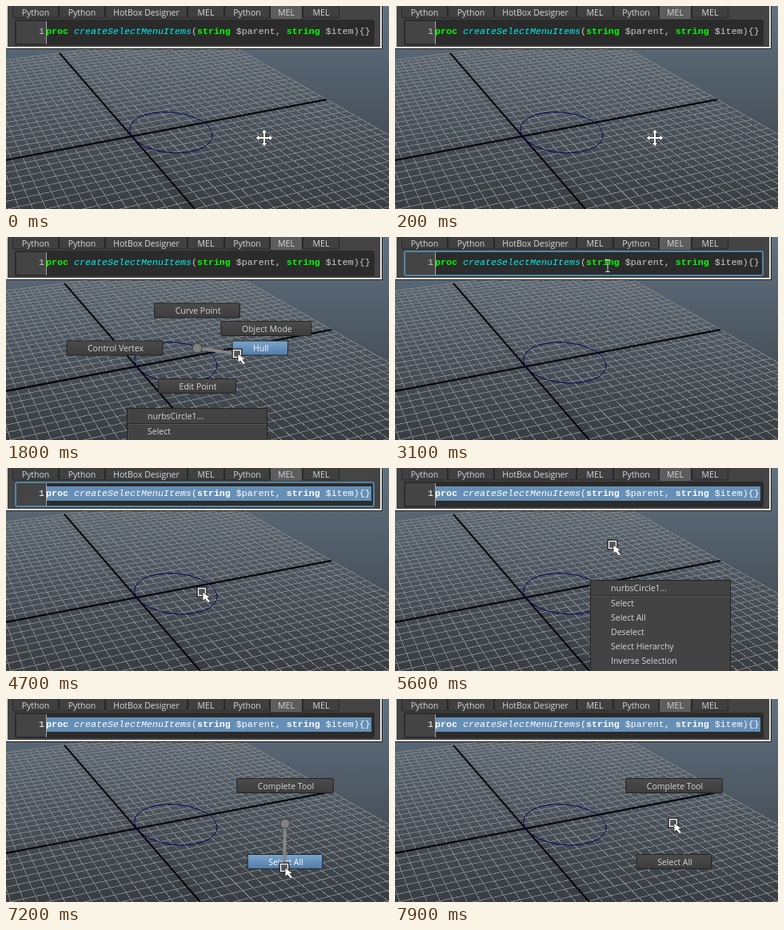
An HTML page that plays this animation: 479x254 px, repeating every 8000 ms.

```html
<!DOCTYPE html>
<html>
<head>
<meta charset="utf-8">
<style>
html, body { margin: 0; width: 100%; height: 100%; overflow: hidden; background: #4a535c; }
svg { display: block; width: 479px; height: 254px; }
text { font: 10.5px "Open Sans", "Noto Sans", sans-serif; fill: #d6d6d6; }
.code { font: 11.67px "Liberation Mono", monospace; white-space: pre; fill: #cccccc; }
.key { font-weight: bold; fill: #00ff00; }
.fn { font-style: italic; fill: #00f0f0; }
.sel .code, .sel .code tspan { fill: #fff; }
.item.on rect { fill: url(#hot); }
.item.on text { fill: #fff; }
</style>
</head>
<body>
<svg id="stage" viewBox="0 0 479 254">
  <defs>
    <linearGradient id="sky" x2="0" y2="1"><stop stop-color="#607181"/><stop offset="1" stop-color="#383d42"/></linearGradient>
    <linearGradient id="btn" x2="0" y2="1"><stop stop-color="#4c4c4c"/><stop offset="1" stop-color="#3c3c3c"/></linearGradient>
    <linearGradient id="hot" x2="0" y2="1"><stop stop-color="#7da5cb"/><stop offset="1" stop-color="#4f7ba6"/></linearGradient>
  </defs>
  <rect width="479" height="254" fill="url(#sky)"/>
</svg>
<script>
const stage = document.getElementById('stage');

function el(tag, attrs, parent = stage, text) {
  const node = document.createElementNS('http://www.w3.org/2000/svg', tag);
  for (const k in attrs) node.setAttribute(k, attrs[k]);
  if (text !== undefined) node.textContent = text;
  parent.appendChild(node);
  return node;
}
const group = (parent = stage) => el('g', {}, parent);
const box = (x, y, r, b, fill, parent, more) =>
  el('rect', { x, y, width: r - x, height: b - y, fill, ...more }, parent);
const label = (x, y, text, parent) => el('text', { x, y, 'text-anchor': 'middle' }, parent, text);
const show = (node, on) => node.setAttribute('visibility', on ? 'visible' : 'hidden');

// Ground plane in perspective; u and v run from -1 to 1
const scene = group();
function ground(u, v) {
  const a = 0.144 * u, b = 0.398 * v, w = 1 + a + b;
  const x = (163.3 + 2100 * a - 154 * b) / w;
  const y = (162 - 204 * a - 204 * b) / w;
  return x.toFixed(2) + ' ' + y.toFixed(2);
}
const lineU = v => `M${ground(-1, v)}L${ground(1, v)}`;
const lineV = u => `M${ground(u, -1)}L${ground(u, 1)}`;
const CELLS = 24;
let grid = '';
for (let i = -CELLS; i <= CELLS; i++) grid += lineU(i / CELLS) + lineV(i / CELLS);
const ring = Array.from({ length: 72 }, (_, i) => {
  const a = i * Math.PI / 36;
  return ground(0.17 + 0.17 * Math.cos(a), 0.17 * Math.sin(a) - 0.016);
});
el('path', { d: grid, stroke: '#828282', 'shape-rendering': 'crispEdges' }, scene);
el('path', { d: lineU(0) + lineV(0), stroke: '#000', 'stroke-width': 2 }, scene);
el('path', { d: `M${ring.join('L')}Z`, fill: 'none', stroke: '#00005c' }, scene);

// Script editor
const panel = group();
box(0, 0, 471, 54, '#222', panel);
box(0, 0, 470, 53, '#e6e3de', panel);
box(2, 0, 468, 51, '#444', panel);
box(8, 0, 417, 15, '#3a3a3a', panel);
const tabs = [[8, 'Python'], [66, 'Python'], [124, 'HotBox Designer'], [227, 'MEL'],
  [273, 'Python'], [330, 'MEL'], [371, 'MEL']];
tabs.forEach(([x, name], i) => {
  const right = i < 6 ? tabs[i + 1][0] : 417;
  const live = i === 5;
  box(x + .5, -4, right - .5, live ? 17 : 15, live ? '#5d5d5d' : '#404040', panel,
    { stroke: '#272727', rx: 2 });
  label((x + right) / 2, 12, name, panel);
});
box(11, 17, 461, 49, '#2b2b2b', panel, { rx: 2 });
box(13, 19, 50, 47, '#444', panel);
const focus = box(12, 18, 460, 48, 'none', panel, { stroke: '#5285a6', 'stroke-width': 2, rx: 2 });
const picked = box(51, 23, 457, 41, '#668fb6', panel);
box(50, 19, 51, 48, '#a8a8a8', panel);
el('text', { class: 'code', x: 41, y: 35 }, panel, '1');
const code = el('text', { class: 'code', x: 50, y: 35 }, panel);
[['proc', 'key'], [' '], ['createSelectMenuItems', 'fn'], ['('], ['string', 'key'],
  [' $parent, '], ['string', 'key'], [' $item){}']]
  .forEach(([s, c]) => el('tspan', c ? { class: c } : {}, code, s));

// Marking menu: items sit around the hub and are as wide as their text needs
function radial(hx, hy, items) {
  const g = group();
  const parts = items.map(([name, dx, dy]) => {
    const item = el('g', { class: 'item' }, g);
    const text = label(0, hy + dy + 4, name, item);
    const half = text.getComputedTextLength() / 2 + 25;
    const cx = hx + dx + Math.sign(dx) * half, cy = hy + dy;
    text.setAttribute('x', cx + 1);
    item.prepend(box(cx - half, cy - 9, cx + half, cy + 9, 'url(#btn)', item, { stroke: '#222', rx: 1 }));
    return { item, cx, cy, half };
  });
  const hub = group(g);
  const arm = el('line', { x1: hx, y1: hy, stroke: '#858585', 'stroke-width': 4 }, hub);
  el('circle', { cx: hx, cy: hy, r: 6, fill: '#808080', stroke: '#3a3a3a' }, hub);
  return (on, x, y) => {
    show(g, on);
    show(hub, on && Math.hypot(x - hx, y - hy) > 5);
    arm.setAttribute('x2', x);
    arm.setAttribute('y2', y);
    for (const p of parts)
      p.item.classList.toggle('on', Math.abs(x - p.cx) < p.half && Math.abs(y - p.cy) < 9);
  };
}
function list(x, y, names) {
  const g = group();
  box(x + .5, y + .5, x + 175.5, 260, '#434343', g, { stroke: '#222' });
  names.forEach((name, i) =>
    el('text', { x: x + 26, y: y + 14 + i * 18 + (i ? 1 : 0) }, g, name));
  box(x + 2, y + 19, x + 174, y + 20, '#2b2b2b', g);
  box(x + 2, y + 20, x + 174, y + 21, '#555', g);
  return g;
}
const curveList = list(151, 214, ['nurbsCircle1...', 'Select']);
const curveMenu = radial(239, 139, [['Curve Point', 0, -47], ['Object Mode', 30, -24.5],
  ['Control Vertex', -43, 0], ['Hull', 44, 0], ['Edit Point', 0, 47.5]]);
const popup = list(244, 140, ['nurbsCircle1...', 'Select', 'Select All', 'Deselect',
  'Select Hierarchy', 'Inverse Selection']);
const toolMenu = radial(349, 156, [['Complete Tool', 0, -47.5], ['Select All', 0, 47.5]]);

// Pointers, each with its hot spot at 0,0
const pointers = { pan: group(), beam: group(), arrow: group(), pick: group() };
for (const turn of [0, 90, 180, 270])
  el('path', { d: 'M-1 -1V-6H-4L0 -11L4 -6H1V-1Z', fill: '#fff', stroke: '#222',
    'stroke-width': .8, transform: `rotate(${turn})` }, pointers.pan);
box(-1, -6, 1, 6, '#fff', pointers.pan);
box(-6, -1, 6, 1, '#fff', pointers.pan);
el('path', { d: 'M-3 -7.5H3M0 -7.5V7.5M-3 7.5H3', stroke: '#ddd' }, pointers.beam);
box(-5, -5, 5, 5, 'none', pointers.pick, { stroke: '#222', 'stroke-width': 3 });
box(-4.5, -4.5, 4.5, 4.5, '#555', pointers.pick, { stroke: '#fff', 'stroke-width': 1.3 });
for (const p of [pointers.arrow, pointers.pick])
  el('path', { d: 'M1 0V11.5L4 9L8 14L10.5 12L7 7.5H11Z', fill: '#fff', stroke: '#222',
    'stroke-width': .8 }, p);

// First step, number of 100 ms steps, x and y reached
const moves = [
  [100, 2, 325, 165], [400, 2, 329, 164], [600, 4, 236, 138], [1300, 2, 226, 141],
  [1600, 1, 190, 140], [1700, 1, 238, 96], [1800, 1, 289, 146], [1900, 1, 243, 190],
  [2100, 3, 238, 142], [2700, 4, 262, 8], [3100, 1, 266, 36], [3400, 5, 452, 38],
  [4200, 4, 245, 155], [4800, 3, 246, 138], [5400, 4, 280, 82], [5900, 5, 349, 155],
  [6800, 2, 349, 102], [7100, 2, 348, 211], [7300, 2, 349, 112], [7700, 3, 348, 155]
];
function pointerAt(t) {
  let x = 323, y = 165;
  for (const [from, steps, nx, ny] of moves) {
    if (t < from) break;
    const k = Math.min(1, ((t - from) / 100 + 1) / steps);
    x += (nx - x) * k;
    y += (ny - y) * k;
  }
  return [Math.round(x), Math.round(y)];
}

function draw(now) {
  const t = Math.floor((now % 8000) / 100) * 100;
  const during = (a, b) => t >= a && t < b;
  const [x, y] = pointerAt(t);

  // The view follows the pointer while it pans
  const panning = t < 600;
  scene.setAttribute('transform', panning ? `translate(${x - 329} ${y - 164})` : '');

  show(focus, during(2900, 4900));
  show(picked, t >= 3200);
  panel.classList.toggle('sel', t >= 3200);

  const marking = during(1000, 2500);
  show(curveList, marking);
  curveMenu(marking, x, y);
  show(popup, during(4900, 5900));
  toolMenu(t >= 6700, x, y);

  const kind = panning ? 'pan' : y > 52 ? 'pick' : y > 17 ? 'beam' : 'arrow';
  for (const k in pointers) show(pointers[k], k === kind);
  pointers[kind].setAttribute('transform', `translate(${x} ${y})`);
}

const start = performance.now();
function tick() {
  draw(performance.now() - start);
  requestAnimationFrame(tick);
}
tick();
</script>
</body>
</html>
```
